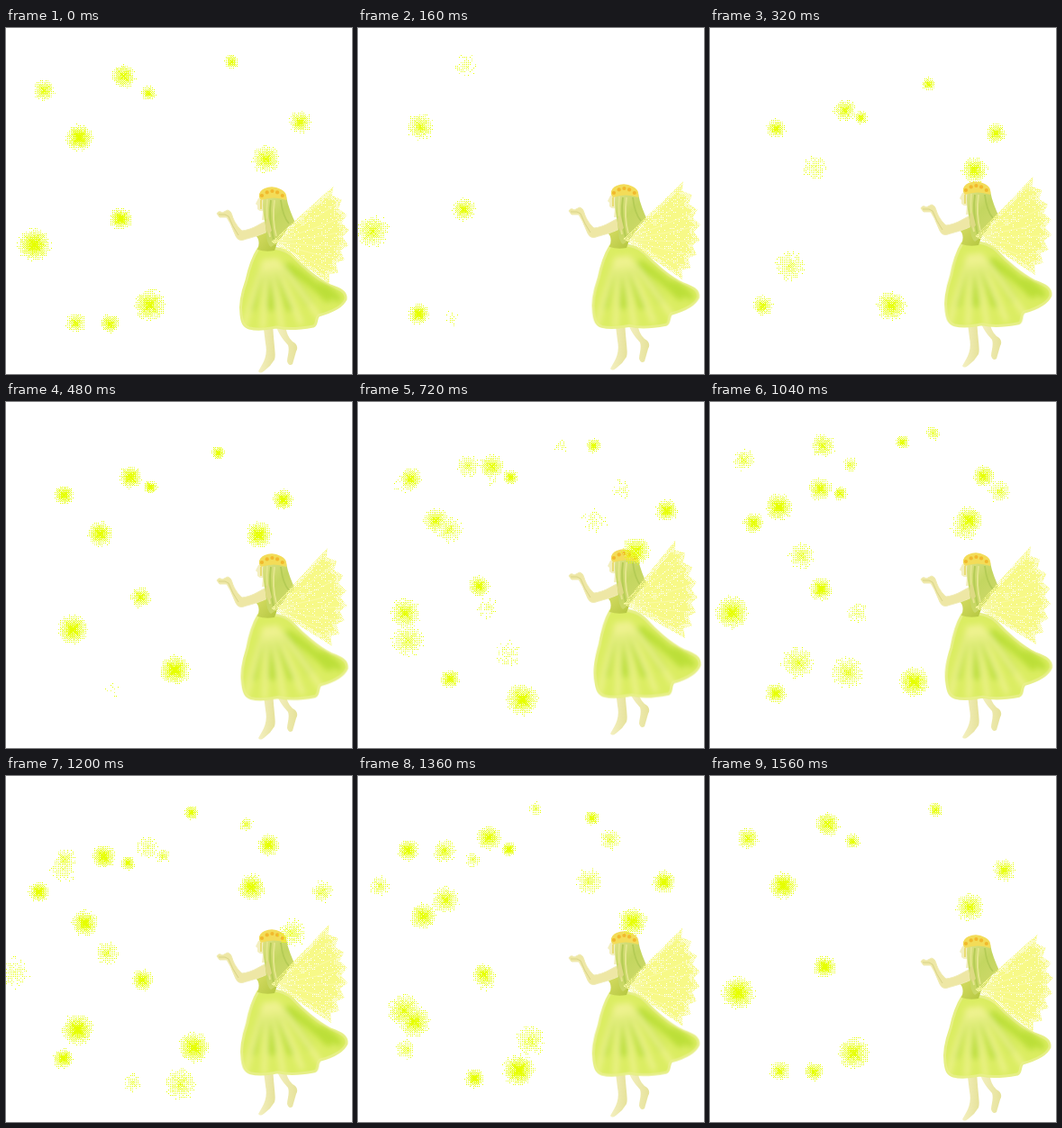
Recreate the animation shown at these times as an HTML page with a canvas. Size 384 px wide and 384 px high, loop 1600 ms.

```html
<!DOCTYPE html>
<html lang="en">
<head>
<meta charset="utf-8">
<title>Fairy and glitter</title>
<style>
html, body { margin: 0; width: 100%; height: 100%; overflow: hidden; background: #fff; }
svg, canvas { position: absolute; left: 0; top: 0; width: 384px; height: 384px; display: block; }
</style>
</head>
<body>
<svg viewBox="0 0 384 384">
  <defs>
    <filter id="soft" x="-20%" y="-20%" width="140%" height="140%"><feGaussianBlur stdDeviation="3"/></filter>
    <filter id="edge" x="-10%" y="-10%" width="120%" height="120%"><feGaussianBlur stdDeviation=".6"/></filter>
    <linearGradient id="hair" x1="0" y1="0" x2=".6" y2="1">
      <stop offset="0" stop-color="#dfe287"/><stop offset=".5" stop-color="#c3d660"/><stop offset="1" stop-color="#cfd96a"/>
    </linearGradient>
    <linearGradient id="top" x1="0" y1="0" x2="1" y2="1">
      <stop offset="0" stop-color="#dbe06a"/><stop offset="1" stop-color="#b3c63e"/>
    </linearGradient>
    <linearGradient id="skin" x1="0" y1="0" x2="1" y2="0">
      <stop offset="0" stop-color="#f4f0c2"/><stop offset="1" stop-color="#e6e29a"/>
    </linearGradient>
    <path id="cloth" d="M280 245C273 256 270 266 267 280C262 294 259 306 261 318C262 327 264 331 270 333C282 336 292 333 301 332C313 335 330 333 341 331C346 329 343 323 347 319C358 316 373 310 377 301C378 293 371 290 360 286C345 279 328 264 318 253C311 246 303 245 297 244Z"/>
    <clipPath id="cut"><use href="#cloth"/></clipPath>
  </defs>
  <g id="fairy">
    <g fill="url(#skin)" filter="url(#edge)">
      <path d="M285 326L288 350C290 360 288 367 284 374L280 381Q282 384 286 381L293 375L298 368C300 362 297 352 296 326Z"/>
      <path d="M299 328C302 340 308 346 313 352C315 358 312 365 312 370Q314 376 318 373L322 359C325 354 322 350 318 348C313 343 311 338 310 328Z"/>
    </g>
    <g id="skirt">
      <use href="#cloth" fill="#dbed62" stroke="#e6ef86" stroke-width="3" filter="url(#edge)"/>
      <g clip-path="url(#cut)"><g id="folds" filter="url(#soft)" fill="none" stroke-linecap="round"></g></g>
    </g>
    <g filter="url(#edge)">
      <path d="M280 189L277 195L279 197L279 201Q282 204 285 203L284 213L294 214L296 188Z" fill="#f3efc0"/>
      <path d="M279 224Q287 219 296 221L302 236L298 247Q288 249 279 246Q283 236 277 230Z" fill="url(#top)"/>
      <path d="M234 206Q236 202 240 205L246 202Q250 203 251 208C253 215 258 222 262 225C272 224 279 219 287 215Q294 217 290 226C280 231 270 233 264 235Q258 237 255 231L249 217L245 210L237 210Z" fill="#eee7a5" stroke="#f0ebb4"/>
      <path d="M236 207L243 207L247 209Q251 220 258 230" fill="none" stroke="#d9d487"/>
      <path d="M286 186C283 200 288 214 289 228Q289 239 294 243C301 239 308 231 313 221L321 216C317 207 313 198 311 187Q297 181 286 186Z" fill="url(#hair)"/>
      <path d="M290 190Q288 210 293 232M298 191Q295 213 300 231" fill="none" stroke="#e3e58c" stroke-width="2"/>
      <path d="M305 191Q307 209 314 217M294 191Q291 210 297 235" fill="none" stroke="#b4cb55" stroke-width="1.8"/>
      <path d="M291 209Q285 218 291 229L295 225Z" fill="#ddda83"/>
      <path d="M281 188Q280 181 287 178Q296 174 305 179Q313 183 311 191Q297 186 283 191Z" fill="#f3dc58"/>
      <g id="buds" fill="#f1b92d"></g>
      <path d="M283 191L283 201" stroke="#e9dc73" stroke-width="2"/>
    </g>
  </g>
</svg>
<canvas id="glow" width="384" height="384"></canvas>
<script>
const STEP = 40, FRAMES = 40, CYCLE = 1560, LIFE = 570;
const $ = id => document.getElementById(id);
const fairy = $('fairy'), skirt = $('skirt');
const ctx = $('glow').getContext('2d');

for (let i = 0; i < 5; i++)
  $('buds').innerHTML += `<circle cx="${284 + i * 5.7}" cy="${186 - 5 * Math.sin(i * Math.PI / 4)}" r="2.1"/>`;

// Folds fan out from the waist; green hollows lie between pale ridges.
function fold(x, y, from, color, width) {
  const sx = 291 + (x - 291) * from, sy = 246 + (y - 246) * from;
  $('folds').innerHTML += `<path d="M${sx} ${sy}Q${(sx + x) / 2} ${(sy + y) / 2 - 4} ${x} ${y}"
    stroke="${color}" stroke-width="${width}"/>`;
}
for (let i = 0; i < 5; i++) {
  const x = 273 + i * 21, y = 310 - Math.max(0, i - 2) * 5;
  fold(x, y, .35, '#bcdf38', 9);
  fold(x - 9, y + 22, .15, '#eef28f', 5);
}
fold(368, 300, .75, '#bcdf38', 8);

// Emission sites: x, y, radius, delay. Each wave turns and scales the whole set.
const sites = [
  [69, 96, 11.5, 0], [158, 81, 13, 40], [177, 91, 8, 0], [269, 56, 8, 0],
  [354, 132, 12, 0], [323, 180, 15, 0], [106, 146, 14.5, 120], [145, 229, 12, 160],
  [62, 271, 17.5, 110], [199, 347, 17, 0], [84, 334, 11, 310]
];
const waves = [
  { start: 165, angle: -6, scale: .85 },
  { start: 540, angle: 0, scale: 1 },
  { start: 850, angle: -18.5, scale: .91 },
  { start: 1132, angle: 0, scale: 1 }
];
const center = { x: 190, y: 190 };

function hash(x, y) {
  const n = Math.sin(x * 12.9898 + y * 78.233) * 43758.5453;
  return n - Math.floor(n);
}

// Fine lattice with a little noise, from 0 to 1.
const grain = (x, y) => (((x ^ y) & 1) * 2 + (y & 1) + hash(x, y)) / 4;

function drawStar(cx, cy, size, power) {
  const r = Math.ceil(size);
  for (let y = -r; y <= r; y++) for (let x = -r; x <= r; x++) {
    const d = Math.hypot(x, y) / size;
    if (d > 1) continue;
    const arm = Math.abs(Math.abs(x) - Math.abs(y)) < 2 ? .35 : 0;
    const density = power * (1 - d) * (1.2 + arm);
    const h = grain(cx + x, cy + y);
    if (h > density) continue;
    ctx.fillStyle = h > density * .75 ? '#efff55' : '#e6ff00';
    ctx.fillRect(cx + x, cy + y, 1, 1);
  }
}

function drawWave({ start, angle, scale }, t) {
  const m = new DOMMatrix()
    .translate(center.x + (angle && 3), center.y - (angle && 3))
    .rotate(angle).scale(scale).translate(-center.x, -center.y);
  for (const [x, y, size, delay] of sites) {
    const age = (t - start - delay + 2 * CYCLE) % CYCLE;
    if (age >= LIFE) continue;
    const way = age * size * .0055;
    const p = m.transformPoint({ x: x - way, y: y - way });
    const power = Math.sin(Math.PI * age / LIFE) ** .7;
    drawStar(Math.round(p.x), Math.round(p.y), size * 1.12 * (scale + 1) / 2, power);
  }
}

// Wing measured from its root: a fan of feathers, longest at the top.
const wing = new Path2D('M0 0'), veins = new Path2D();
for (let i = 0; i < 8; i++) {
  const at = (deg, r) => [r * Math.cos(deg * Math.PI / 180), r * Math.sin(deg * Math.PI / 180)];
  const deg = -42 + i * 11.2, r = 92 - i * 1.8;
  const tip = at(deg, r);
  wing.lineTo(...tip);
  if (i < 7) wing.lineTo(...at(deg + 4.5, r - 8));
  veins.moveTo(0, 0);
  veins.quadraticCurveTo(...at(deg + 4, r * .6), ...tip);
}
wing.closePath();

function specks(density) {
  const tile = document.createElement('canvas');
  tile.width = tile.height = 64;
  const c = tile.getContext('2d');
  for (let y = 0; y < 64; y++) for (let x = 0; x < 64; x++)
    if (grain(x, y) < density) c.fillRect(x, y, 1, 1);
  return ctx.createPattern(tile, 'repeat');
}
const sparse = specks(.07), dense = specks(.36);

function drawWing(lift, u) {
  const x = 295, y = 237 - lift;
  const m = new DOMMatrix().translate(x, y).rotate(-8 * u).scale(1 - .03 * u, 1);
  const shape = new Path2D(), lines = new Path2D();
  shape.addPath(wing, m);
  lines.addPath(veins, m);
  ctx.save();
  const g = ctx.createRadialGradient(x, y, 2, x, y, 30);
  g.addColorStop(0, 'rgba(240,244,120,.6)');
  g.addColorStop(1, '#f7f987');
  ctx.fillStyle = g;
  ctx.fill(shape);
  ctx.clip(shape);
  ctx.strokeStyle = '#fafaa6';
  ctx.stroke(lines);
  ctx.globalCompositeOperation = 'destination-out';
  ctx.fillStyle = sparse;
  ctx.fill(shape);
  ctx.strokeStyle = dense;
  ctx.lineWidth = 9;
  ctx.stroke(shape);
  ctx.restore();
}

function draw(time) {
  const t = Math.floor(time / STEP) % FRAMES * STEP % CYCLE;
  const swing = 1 - Math.abs(2 * t / CYCLE - 1);
  const lift = Math.round(Math.min(12.8, 13.7 * swing));
  const u = lift / 13;
  fairy.setAttribute('transform', `translate(0 ${-lift})`);
  // The skirt trails behind: it leans and lengthens as she rises.
  skirt.setAttribute('transform', `translate(0 246) skewX(${2.1 * u}) scale(1 ${1 + .07 * u}) translate(0 -246)`);
  ctx.clearRect(0, 0, 384, 384);
  drawWing(lift, u);
  for (const w of waves) drawWave(w, t);
}

const start = performance.now();
function tick() {
  draw(performance.now() - start);
  requestAnimationFrame(tick);
}
tick();
</script>
</body>
</html>
```
